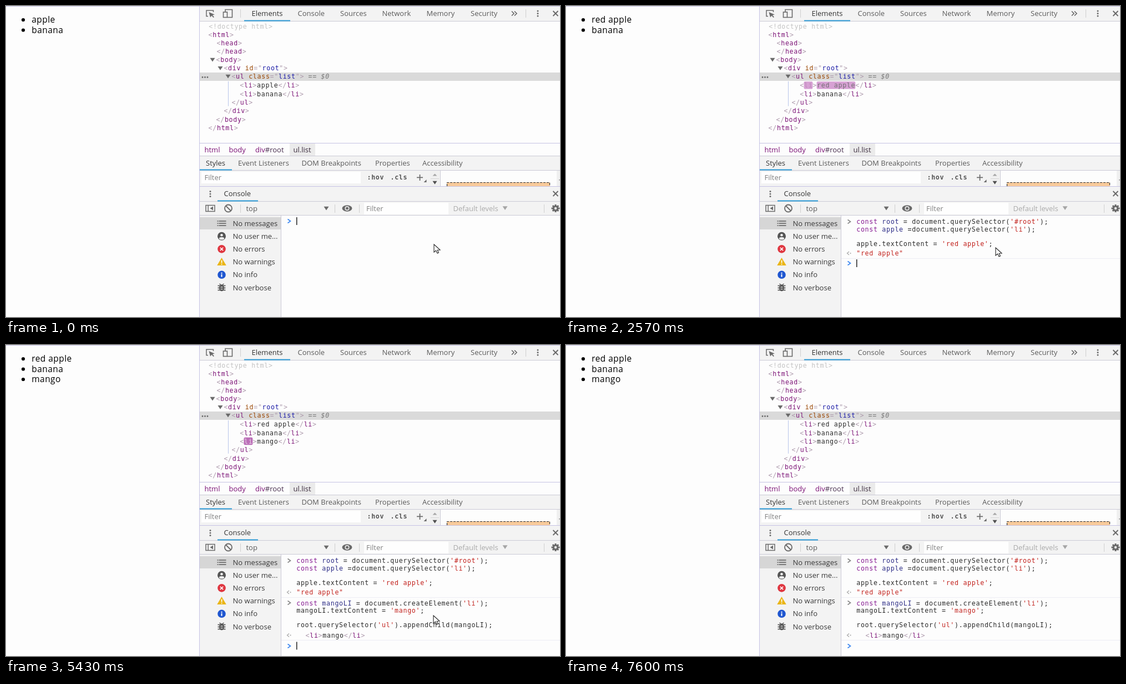
Animation of 998x561 px, one loop 7.71 s. Source, as an HTML page with a canvas:

```html
<!DOCTYPE html>
<html lang="en">
<head>
<meta charset="utf-8">
<title>DOM console demo</title>
<style>
html, body { margin: 0; width: 100%; height: 100%; overflow: hidden; background: #fdfdfd; }
canvas { display: block; width: 100vw; height: 100vh; }
</style>
</head>
<body>
<canvas id="stage" width="998" height="561"></canvas>
<script>
const ctx = document.getElementById('stage').getContext('2d');
const LOOP = 7710, ADV = 7.69, CODE_SIZE = 11.6;
const UI = '"Open Sans", "Noto Sans", sans-serif';
const MONO = '"DejaVu Sans Mono", "Noto Sans Mono", monospace';
const C = {
  page: '#fdfdfd', bar: '#f3f3f3', line: '#cbcad6', edge: '#c6c3e4', blue: '#2f9bd6',
  ink: '#2b2b2b', label: '#5a5a5a', icon: '#6a6a6a', tag: '#7c1276', brace: '#ad9aac',
  attr: '#994500', value: '#1a1aa6', word: '#861a92', def: '#2c2c86', str: '#c2211c', prompt: '#3a86f0'
};

// Events on the timeline (ms)
const PASTE1 = 930, RUN1 = 2230, PASTE2 = 3570, PASTE3 = 4500, RUN2 = 5300;

const APPLE_CODE = [
  "const root = document.querySelector('#root');",
  "const apple =document.querySelector('li');",
  "",
  "apple.textContent = 'red apple';"
];
const MANGO_CODE = [
  "const mangoLI = document.createElement('li');",
  "mangoLI.textContent = 'mango';",
  "",
  "root.querySelector('ul').appendChild(mangoLI);"
];

// ---------- drawing helpers ----------
function rect(x, y, w, h, color) {
  ctx.fillStyle = color;
  ctx.fillRect(x, y, w, h);
}

function path(points, color, width, close) {
  ctx.beginPath();
  points.forEach(([x, y], i) => i ? ctx.lineTo(x, y) : ctx.moveTo(x, y));
  if (close) ctx.closePath();
  if (width) {
    ctx.lineWidth = width;
    ctx.strokeStyle = color;
    ctx.stroke();
  } else {
    ctx.fillStyle = color;
    ctx.fill();
  }
}

function disc(x, y, r, color, width) {
  ctx.beginPath();
  ctx.arc(x, y, r, 0, 7);
  ctx.fillStyle = ctx.strokeStyle = color;
  ctx.lineWidth = width || 0;
  width ? ctx.stroke() : ctx.fill();
}

function oval(x, y, rx, ry, color) {
  ctx.beginPath();
  ctx.ellipse(x, y, rx, ry, 0, 0, 7);
  ctx.fillStyle = color;
  ctx.fill();
}

function box(x, y, w, h, color, width) {
  ctx.strokeStyle = color;
  ctx.lineWidth = width;
  ctx.strokeRect(x, y, w, h);
}

function label(s, x, y, color = C.label, size = 13, gap = 0) {
  ctx.font = `${size}px ${UI}`;
  ctx.letterSpacing = gap + 'px';
  ctx.fillStyle = color;
  ctx.fillText(s, x, y + size * 0.35);
}

// Monospaced runs: [text, color] pairs set one after another
function runs(x, y, list, style = '') {
  ctx.font = `${style} ${CODE_SIZE}px ${MONO}`;
  ctx.letterSpacing = (ADV - CODE_SIZE * 0.602) + 'px';
  for (const [s, color] of list) {
    ctx.fillStyle = color;
    ctx.fillText(s, x, y + 4);
    x += s.length * ADV;
  }
}

function arrowDown(x, y, color, r = 4.5) {
  path([[x - r, y - r * 0.7], [x + r, y - r * 0.7], [x, y + r * 0.8]], color);
}

function cross(x, y) {
  path([[x - 4.5, y - 4.5], [x + 4.5, y + 4.5]], C.icon, 2);
  path([[x + 4.5, y - 4.5], [x - 4.5, y + 4.5]], C.icon, 2);
}

function dots(x, y) {
  for (const d of [-4.5, 0, 4.5]) disc(x, y + d, 1.5, C.icon);
}

function chevron(x, y, color) {
  path([[x - 2.5, y - 3.5], [x + 2.5, y], [x - 2.5, y + 3.5]], color, 1.6);
}

// ---------- flash on changed nodes ----------
function easeOut(x) {
  let lo = 0, hi = 1;
  for (let i = 0; i < 20; i++) {
    const s = (lo + hi) / 2;
    if (0.6 * s * s + 0.4 * s ** 3 < x) lo = s; else hi = s;
  }
  return 3 * lo * lo - 2 * lo ** 3;
}

function mix(a, b, p) {
  return `rgb(${a.map((v, i) => Math.round(v + (b[i] - v) * p))})`;
}

function flash(age) {
  if (age < 0 || age >= 1400) return null;
  const p = easeOut(Math.min(1, age / 1120));
  const tail = easeOut(Math.max(0, (age - 1120) / 280));
  return {
    back: tail ? mix([245, 219, 244], [253, 253, 253], tail) : mix([158, 54, 153], [245, 219, 244], p),
    tag: mix([255, 255, 255], [124, 18, 118], p ** 1.6),
    text: mix([255, 255, 255], [40, 34, 40], p)
  };
}

function glow(x, y, chars, color) {
  ctx.fillStyle = color;
  ctx.beginPath();
  ctx.roundRect(x - 0.5, y - 7, chars * ADV + 0.5, 13.5, 2);
  ctx.fill();
}

// ---------- page ----------
function drawPage(items) {
  items.forEach((s, i) => {
    const y = 25 + i * 18.5;
    disc(31, y, 3.1, '#000');
    label(s, 46.2, y, '#000', 15.5, 0.45);
  });
}

// ---------- elements panel ----------
const open = n => [['<', C.brace], [n, C.tag], ['>', C.brace]];
const shut = n => [['</', C.brace], [n, C.tag], ['>', C.brace]];
const withAttr = (n, k, v) => [['<', C.brace], [n, C.tag], [' ' + k, C.attr], ['="', C.brace],
  [v, C.value], ['"', C.brace], ['>', C.brace]];

function drawItem(y, s, tint, all) {
  const x = 421.3;
  if (tint) {
    glow(x + ADV, y, 2, tint.back);
    if (all) glow(x + 4 * ADV, y, s.length, tint.back);
  }
  const tag = tint ? tint.tag : C.tag, text = tint && all ? tint.text : C.ink;
  runs(x, y, [['<', C.brace], ['li', tag], ['>', C.brace], [s, text], ...shut('li')]);
}

function drawElements(items, t) {
  rect(349, 1, 649, 26, C.bar);
  rect(349, 27, 649, 1, C.line);
  // inspect and device icons
  path([[364, 18.5], [361, 18.5], [361, 8], [373.5, 8], [373.5, 11]], C.icon, 1.5);
  path([[365.5, 11], [376, 15.5], [372, 16.5], [375, 20], [373.5, 21], [370.5, 17.5], [368, 20.5]], C.icon);
  path([[395, 11], [395, 6.5], [407.5, 6.5], [407.5, 20.5], [399, 20.5]], C.icon, 1.6);
  box(391.5, 11, 7, 9.5, C.icon, 1.6);
  rect(422, 6, 1, 15, '#cfcfcf');
  rect(936, 6, 1, 15, '#cfcfcf');
  [['Elements', 442.5], ['Console', 525.5], ['Sources', 602], ['Network', 677.5], ['Memory', 757.5], ['Security', 837]]
    .forEach(([s, x], i) => label(s, x, 13.5, i ? C.label : '#333'));
  for (const x of [911, 916])
    path([[x, 9.5], [x + 4, 13.5], [x, 17.5]], C.icon, 1.7);
  dots(958, 13.5);
  cross(990, 13.5);
  rect(429, 25.5, 83, 2, C.blue);

  const row = i => 36.8 + 15.27 * i;
  rect(349, 120, 649, 15, '#dadada');
  for (const x of [354, 358.5, 363]) disc(x, 128.5, 1.4, C.icon);
  runs(365.3, row(0), [['<!doctype html>', '#c3c3c3']]);
  runs(364.6, row(1), open('html'));
  runs(379.5, row(2), open('head'));
  runs(379.5, row(3) - 0.7, shut('head'));
  runs(378.5, row(4) - 1, open('body'));
  runs(392.4, row(5) - 1, withAttr('div', 'id', 'root'));
  runs(406.4, row(6) - 1, withAttr('ul', 'class', 'list'));
  runs(544.5, row(6) - 1, [['== $0', '#777']], 'italic');
  arrowDown(372, row(4) - 1, C.icon);
  arrowDown(386, row(5) - 1, C.icon);
  arrowDown(400, row(6) - 1.5, C.icon);
  items.forEach((s, i) => {
    const tint = i === 0 ? flash(t - RUN1) : i === 2 ? flash(t - RUN2) : null;
    drawItem(row(7 + i) - 0.4, s, tint, i === 0);
  });
  const n = 7 + items.length;
  rect(400, 136, 1, items.length * 15.3 + 14, '#b9c6ea');
  [['ul', 406.4], ['div', 392.4], ['body', 378.5], ['html', 364.6]]
    .forEach(([s, x], i) => runs(x, row(n + i) - 0.2, shut(s)));
}

function drawStyles() {
  rect(349, 247, 649, 1, C.edge);
  rect(511, 248, 46, 22, '#ebebeb');
  label('html', 357.5, 259.5, C.tag);
  label('body', 401.5, 259.5, C.tag);
  label('div', 449, 259.5, C.tag);
  label('#root', 449 + ctx.measureText('div').width, 259.5, '#4a3050');
  label('ul.list', 517.5, 259.5, '#3a2a3c');

  rect(349, 270, 649, 26, C.bar);
  rect(349, 270, 649, 1, C.line);
  rect(349, 296, 649, 1, C.line);
  [['Styles', 360], ['Event Listeners', 418], ['DOM Breakpoints', 532.5], ['Properties', 665], ['Accessibility', 750]]
    .forEach(([s, x], i) => label(s, x, 283.3, i ? C.label : '#333'));
  rect(349, 294.5, 58, 2, C.blue);

  rect(349, 297, 433, 28, C.bar);
  rect(352, 299, 287, 21, '#fefefe');
  label('Filter', 357.5, 309.5, '#808080');
  runs(650.5, 309, [[':hov', '#555']], 'bold');
  runs(692.5, 309, [['.cls', '#555']], 'bold');
  rect(740, 308.5, 11, 1.7, C.icon);
  rect(744.7, 304, 1.7, 11, C.icon);
  path([[757.5, 313], [757.5, 318], [752.5, 318]], C.icon);
  rect(764, 297, 17, 28, '#f0f0f0');
  path([[768.5, 306.5], [776.5, 306.5], [772.5, 302.5]], '#a5a5a5');
  rect(765, 311, 15, 1, '#d5d5d5');
  arrowDown(772.5, 318.5, '#505050', 4);
  rect(782, 297, 1, 28, C.line);
  rect(783, 297, 210, 28, C.page);
  rect(794, 318, 186, 7, '#f8ca9a');
  ctx.setLineDash([4, 2]);
  path([[794.5, 325], [794.5, 318.5], [979.5, 318.5], [979.5, 325]], '#333', 1.2);
  ctx.setLineDash([]);
  rect(992, 297, 6, 28, '#f0f0f0');
  rect(996, 313, 2, 1.5, '#999');
}

// ---------- console drawer ----------
const SIDE = ['No messages', 'No user me...', 'No errors', 'No warnings', 'No info', 'No verbose'];

function sideIcon(i, x, y) {
  if (i === 0) {
    for (const d of [-4, 0, 4]) {
      rect(x - 8, y + d - 0.8, 2, 1.7, C.icon);
      rect(x - 5, y + d - 0.8, 13, 1.7, C.icon);
    }
  } else if (i === 1) {
    disc(x, y, 7.5, '#555');
    disc(x, y - 2, 2.3, C.bar);
    oval(x, y + 4, 4.5, 2.3, C.bar);
  } else if (i === 2) {
    disc(x, y, 7.3, '#df3640');
    path([[x - 2.7, y - 2.7], [x + 2.7, y + 2.7]], '#fff', 1.6);
    path([[x + 2.7, y - 2.7], [x - 2.7, y + 2.7]], '#fff', 1.6);
  } else if (i === 3) {
    path([[x, y - 7.5], [x + 8.3, y + 6.5], [x - 8.3, y + 6.5]], '#eab516');
    rect(x - 0.8, y - 3, 1.7, 5, '#fff');
    rect(x - 0.8, y + 3.3, 1.7, 1.7, '#fff');
  } else if (i === 4) {
    disc(x, y, 7.3, '#1f56d0');
    rect(x - 1, y - 4, 2, 2, '#fff');
    rect(x - 1, y - 1, 2, 5, '#fff');
  } else {
    for (const d of [-3.5, 0.5, 4.5]) rect(x - 7, y + d - 0.8, 14, 1.7, '#555');
    oval(x, y + 0.5, 4.5, 6, '#555');
    path([[x - 4, y - 7], [x, y - 4], [x + 4, y - 7]], '#555', 1.4);
    rect(x - 2, y - 1.5, 4, 1.2, C.bar);
    rect(x - 2, y + 2, 4, 1.2, C.bar);
  }
}

function drawDrawer() {
  rect(349, 325, 649, 53, C.bar);
  rect(349, 325, 649, 1, C.edge);
  rect(349, 352, 649, 1, C.line);
  rect(349, 377, 649, 1, C.line);
  dots(368, 339);
  label('Console', 392.5, 338.5, '#333');
  rect(381, 350.5, 73, 2, C.blue);
  cross(990, 338.5);

  box(360, 359.5, 16, 11, C.icon, 1.5);
  rect(363.5, 360, 1.4, 10, C.icon);
  path([[373, 361.5], [373, 368.5], [367.5, 365]], C.icon);
  disc(400.5, 365, 6.5, C.icon, 1.8);
  path([[396, 360.5], [405, 369.5]], C.icon, 1.8);
  for (const x of [422, 592, 636, 969]) rect(x, 358, 1, 15, '#cfcfcf');
  label('top', 432.5, 365.5);
  arrowDown(577, 365, C.icon);
  oval(614.5, 365, 9, 5.8, C.icon);
  disc(614.5, 365, 4, C.bar);
  disc(614.5, 365, 2.5, C.icon);
  rect(645, 355, 152, 21, '#fefefe');
  label('Filter', 649, 365.5, '#808080');
  label('Default levels', 805.5, 365.5, '#aaa');
  arrowDown(899, 364.5, '#a5a5a5');
  for (let i = 0; i < 4; i++) {
    const a = i * Math.PI / 4, u = Math.cos(a) * 7.5, v = Math.sin(a) * 7;
    path([[990 - u, 365 - v], [990 + u, 365 + v]], C.icon, 3);
  }
  disc(990, 365, 5.2, C.icon);
  disc(990, 365, 2.2, C.bar);

  rect(349, 378, 146, 183, C.bar);
  rect(495, 378, 1, 183, C.line);
  rect(349, 381, 146, 22, '#d6d6d6');
  SIDE.forEach((s, i) => {
    const y = 392 + 23.2 * i;
    sideIcon(i, 388.5, y);
    label(s, 408.5, y, '#383838');
  });
}

function drawCode(lines, y) {
  lines.forEach((s, i) => {
    const parts = s.split(/(const|(?<=const )\w+|'[^']*')/);
    runs(523.2, y + 13.2 * i, parts.map((p, k) => [p,
      k % 2 === 0 ? C.ink : p === 'const' ? C.word : p[0] === "'" ? C.str : C.def]));
  });
}

function resultMark(y) {
  path([[510, y - 3], [506.5, y], [510, y + 3]], '#a8a8a8', 1.3);
  disc(512.5, y, 1.1, '#a8a8a8');
}

function caret(x, y, t, since) {
  if (Math.floor((t - since) / 500) % 2 === 0) rect(x, y - 7, 1.5, 14, '#222');
}

function drawConsole(t) {
  const end = 869;
  if (t < RUN1) {
    chevron(510, 388, C.prompt);
    if (t < PASTE1) {
      if (t < 430) caret(523, 388, t, 0);
    } else {
      drawCode(APPLE_CODE, 388.2);
      caret(end, 388, t, PASTE1);
    }
    return;
  }
  chevron(510, 389, '#888');
  drawCode(APPLE_CODE, 389.3);
  resultMark(446);
  runs(523.2, 446.2, [['"red apple"', C.str]]);
  rect(496, 455, 502, 1, '#ececf4');
  if (t < RUN2) {
    chevron(510, 464, C.prompt);
    if (t < PASTE2) caret(523, 464, t, RUN1);
    else {
      drawCode(t < PASTE3 ? APPLE_CODE : MANGO_CODE, 464.5);
      caret(end, 464, t, t < PASTE3 ? PASTE2 : PASTE3);
    }
    return;
  }
  chevron(510, 465, '#888');
  drawCode(MANGO_CODE, 465.5);
  resultMark(523.5);
  runs(539.5, 524, [...open('li'), ['mango', C.ink], ...shut('li')]);
  rect(496, 532, 502, 1, '#ececf4');
  chevron(510, 543, C.prompt);
  if (t < 7600) caret(523, 542.5, t, RUN2);
}

// ---------- mouse ----------
const MOUSE = [[0, 771, 430], [870, 771, 430], [1250, 773, 431], [1930, 773, 431], [2500, 774, 436],
  [2750, 774, 436], [3130, 815, 460], [3500, 772, 480], [3700, 771, 486], [5000, 771, 486],
  [5400, 770, 488], [5800, 770, 488], [6270, 628, 405], [6770, 1008, 450], [LOOP, 1008, 450]];

function drawMouse(t) {
  const i = MOUSE.findIndex(k => k[0] > t);
  const [t0, x0, y0] = MOUSE[i - 1], [t1, x1, y1] = MOUSE[i];
  const u = (t - t0) / (t1 - t0), p = u * u * (3 - 2 * u);
  const x = x0 + (x1 - x0) * p, y = y0 + (y1 - y0) * p;
  if ((t >= PASTE1 && t < RUN1) || (t >= PASTE2 && t < RUN2)) {
    path([[x, y - 6.5], [x, y + 6.5]], '#222', 1.4);
    for (const d of [-6.5, 6.5]) path([[x - 3.5, y + d], [x + 3.5, y + d]], '#222', 1.4);
  } else {
    const shape = [[0, 0], [0, 14], [3.6, 11], [6, 16], [8.4, 15], [6.2, 10.2], [11, 10]]
      .map(([a, b]) => [x + a, y + b]);
    path(shape, '#fff', 0, true);
    path(shape, '#222', 1.1, true);
  }
}

function draw(t) {
  const items = [t < RUN1 ? 'apple' : 'red apple', 'banana'];
  if (t >= RUN2) items.push('mango');
  rect(0, 0, 998, 561, C.page);
  drawPage(items);
  drawElements(items, t);
  drawStyles();
  drawDrawer();
  drawConsole(t);
  rect(0, 0, 998, 1, C.edge);
  rect(348, 0, 1, 561, C.edge);
  drawMouse(t);
}

const start = performance.now();
function tick() {
  draw((performance.now() - start) % LOOP);
  requestAnimationFrame(tick);
}
tick();
</script>
</body>
</html>
```
